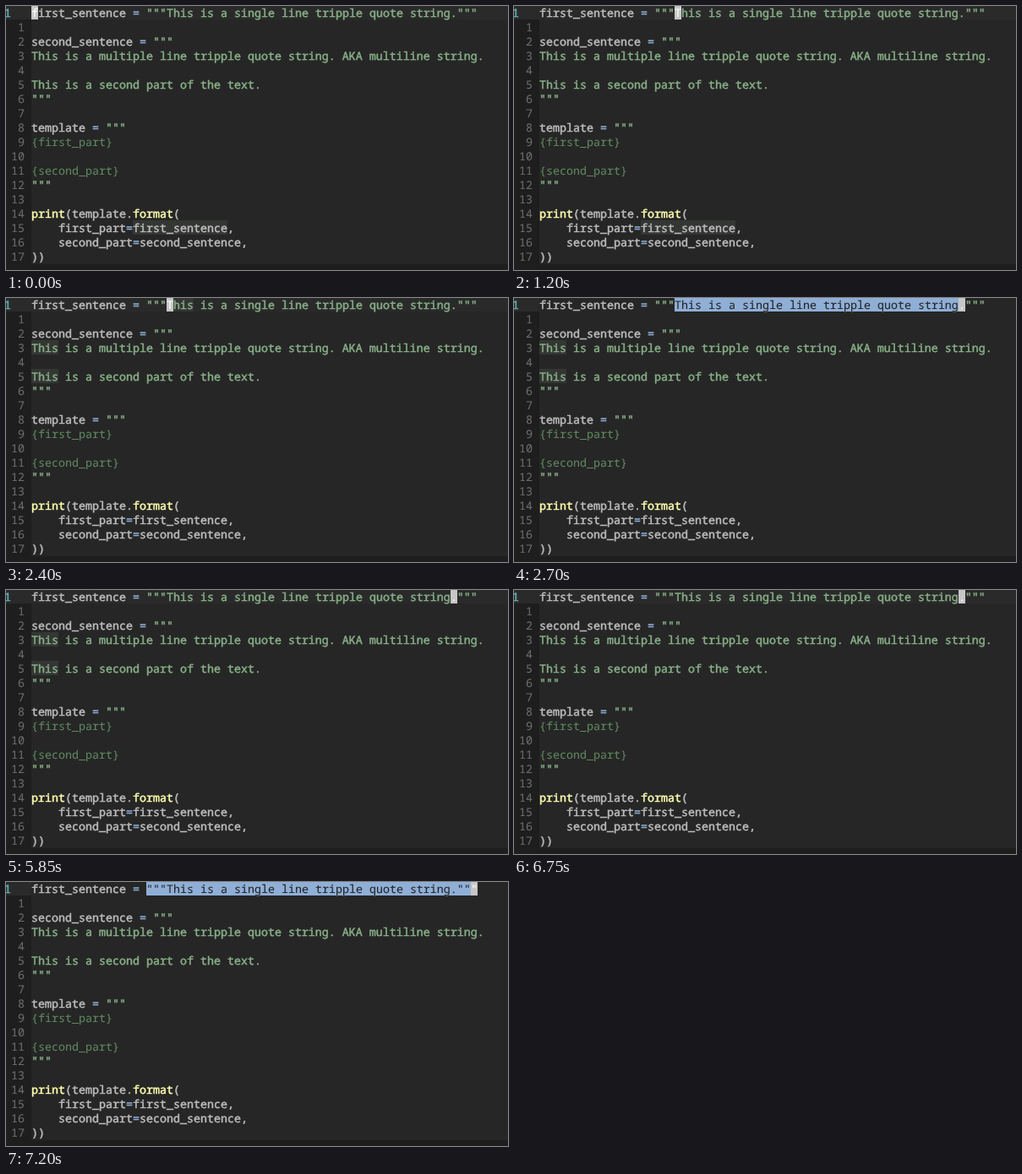
An HTML page that plays this animation: 594 px wide and 313 px high, repeating every 8000 ms.

```html
<!DOCTYPE html>
<html lang="en">
<head>
<meta charset="utf-8">
<title>Editor</title>
<style>
html, body { margin: 0; width: 100%; height: 100%; overflow: hidden; background: #262626; }
svg { display: block; width: 594px; height: 313px; }
text {
  font: 13.333px "Noto Sans Mono", "DejaVu Sans Mono", monospace;
  white-space: pre;
  text-rendering: geometricPrecision;
}
</style>
</head>
<body>
<svg id="stage" viewBox="0 0 594 313"></svg>
<script>
const CELL = 8, LINE = 17, LEFT = 30, BASE = 13, LOOP = 8000;
const BOLD = 0.5, THIN = 0.1;
const C = {
  bg: '#262626', gutter: '#1e1e1e', line: '#2a2a2a', word: '#343634',
  num: '#6c6c6c', current: '#5fafaf', select: '#8fafd7',
  block: '#c7c7c7', glyph: '#ffffff',
  fg: '#bcbcbc', str: '#87af87', field: '#5f875f', op: '#8fafd7', fn: '#ffffaf'
};
const FIRST = 'first_sentence = """This is a single line tripple quote string."""';

// Each line is a list of color/text pairs.
const assign = (name, value) => ['fg', name + ' ', 'op', '= ', 'str', value];
const param = (name, value) => ['fg', '    ' + name, 'op', '=', 'fg', value + ','];
const lines = [
  assign('first_sentence', FIRST.slice(17)),
  [],
  assign('second_sentence', '"""'),
  ['str', 'This is a multiple line tripple quote string. AKA multiline string.'],
  [],
  ['str', 'This is a second part of the text.'],
  ['str', '"""'],
  [],
  assign('template', '"""'),
  ['field', '{first_part}'],
  [],
  ['field', '{second_part}'],
  ['str', '"""'],
  [],
  ['fn', 'print', 'fg', '(template.', 'fn', 'format', 'fg', '('],
  param('first_part', 'first_sentence'),
  param('second_part', 'second_sentence'),
  ['fg', '))']
];

// Matching words: row, column, length.
const name = [[15, 15, 14]];
const others = [[3, 0, 4], [5, 0, 4]];
const steps = [
  { at: 0, cursor: 0, words: name },
  { at: 1200, cursor: 20, words: name },
  { at: 1950, cursor: 20, words: [[0, 20, 4], ...others] },
  { at: 2700, cursor: 62, from: 20, words: others },
  { at: 5850, cursor: 62, words: others },
  { at: 6750, cursor: 62, words: [] },
  { at: 7200, cursor: 65, from: 17, words: [] }
];

const stage = document.getElementById('stage');

function add(parent, tag, attrs, content = '') {
  const el = document.createElementNS('http://www.w3.org/2000/svg', tag);
  for (const key in attrs) el.setAttribute(key, attrs[key]);
  el.textContent = content;
  parent.append(el);
}

function group() {
  add(stage, 'g', {});
  return stage.lastChild;
}

const rect = (parent, x, y, width, height, fill) =>
  add(parent, 'rect', { x, y, width, height, fill });
const cells = (parent, row, col, count, fill) =>
  rect(parent, LEFT + col * CELL, row * LINE - 1, count * CELL, LINE, fill);

// A fine outline sets the weight of the letters.
const write = (parent, row, col, content, fill, weight) =>
  add(parent, 'text', {
    x: LEFT + col * CELL, y: BASE + row * LINE,
    fill, stroke: fill, 'stroke-width': weight
  }, content);

rect(stage, 0, 0, 594, 313, C.bg);
rect(stage, 0, 0, LEFT, 306, C.gutter);
rect(stage, 0, 0, LEFT, 16, C.line);
rect(stage, 0, 306, 594, 7, C.gutter);

const under = group();
const code = group();
const over = group();

lines.forEach((parts, row) => {
  const label = String(row || 1);
  if (row) write(code, row, -1 - label.length, label, C.num, THIN);
  else write(code, row, -4, label, C.current, BOLD);
  let col = 0;
  for (let i = 0; i < parts.length; i += 2) {
    const [kind, content] = parts.slice(i, i + 2);
    write(code, row, col, content, C[kind], kind === 'field' ? THIN : BOLD);
    col += content.length;
  }
});

function show({ cursor, from, words }) {
  under.replaceChildren();
  over.replaceChildren();
  const selecting = from !== undefined;
  if (!selecting) rect(under, LEFT, 0, 564, 16, C.line);
  for (const [row, col, count] of words) cells(under, row, col, count, C.word);
  if (selecting) {
    cells(over, 0, from, cursor - from, C.select);
    write(over, 0, from, FIRST.slice(from, cursor), C.bg, THIN);
  }
  cells(over, 0, cursor, 1, C.block);
  write(over, 0, cursor, FIRST[cursor], C.glyph, THIN);
}

const start = performance.now();
let shown;

function tick() {
  const t = (performance.now() - start) % LOOP;
  const step = steps.filter(s => s.at <= t).pop();
  if (step !== shown) show(shown = step);
  requestAnimationFrame(tick);
}
tick();
</script>
</body>
</html>
```
